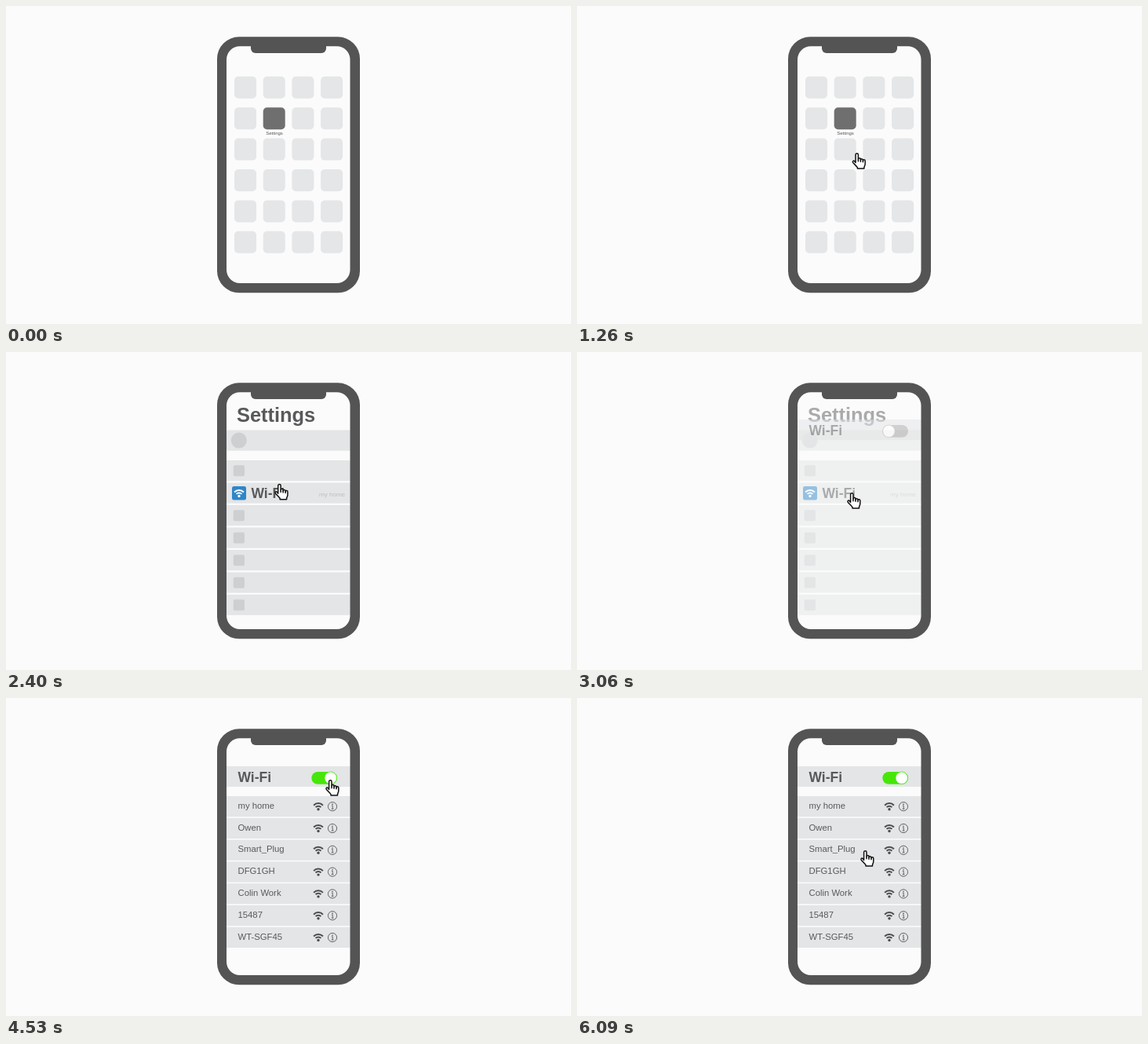
These frames come from a looping animation (720x405 px, 7170 ms). An HTML page:

```html
<!DOCTYPE html>
<html lang="en">
<head>
<meta charset="utf-8">
<title>Connect to Wi-Fi</title>
<style>
  html, body { margin: 0; width: 100%; height: 100%; overflow: hidden; background: #fbfbfb; }
  svg { display: block; width: 100vw; height: 100vh; }
  text { font-family: "Liberation Sans", Arial, sans-serif; fill: #58595b; }
  .bold { font-weight: bold; }
</style>
</head>
<body>
<svg viewBox="0 0 720 405">
  <defs>
    <g id="wifi" fill="none" stroke="currentColor" stroke-width="2">
      <path d="M-5.9-1.5A8 8 0 0 1 5.9-1.5M-3.4.9A4.7 4.7 0 0 1 3.4.9"/>
      <circle cy="3.5" r="1.7" fill="currentColor" stroke="none"/>
    </g>
    <g id="info" fill="none" stroke="#58595b" stroke-width=".9">
      <circle r="5.6"/>
      <path d="M-1.1-1.1H.2V3M-1.3 3H1.5"/>
      <circle cy="-2.8" r=".8" fill="#58595b" stroke="none"/>
    </g>
  </defs>
  <rect width="720" height="405" fill="#fbfbfb"/>
  <g id="home"></g>
  <g id="settings"></g>
  <g id="off"></g>
  <g id="on"></g>
  <g fill="#545454">
    <path fill-rule="evenodd" d="M297 39.3H423A28 28 0 0 1 451 67.3V337.3A28 28 0 0 1 423 365.3H297A28 28 0 0 1 269 337.3V67.3A28 28 0 0 1 297 39.3Z
      M298 51.3A17 17 0 0 0 281 68.3V336A17 17 0 0 0 298 353H421.5A17 17 0 0 0 438.5 336V68.3A17 17 0 0 0 421.5 51.3Z"/>
    <path d="M312 50H408V54A6 6 0 0 1 402 60H318A6 6 0 0 1 312 54Z"/>
  </g>
  <g id="hand" fill="#fff" stroke="#111" stroke-width="1.5" stroke-linejoin="round" stroke-linecap="round">
    <path d="M4.6 12.5V2.4a1.7 1.7 0 0 1 3.4 0V8a1.5 1.4 0 0 1 3 0V9.2a1.5 1.4 0 0 1 3 0V10a1.4 1.4 0 0 1 2.8 .3V14c0 2-.8 3-1.3 4.2V20H7V18.6C5.4 16.6 2.6 14 1.2 12.2c-.9-1.4.8-2.7 2-1.7z"/>
    <path fill="none" d="M8 8.2V10.8M11 9V11.2M14 10V11.8"/>
  </g>
</svg>
<script>
const LOOP = 7170;
const ROW = '#e3e5e6', MARK = '#cecfd1';
const $ = id => document.getElementById(id);
const range = n => [...Array(n).keys()];

const rect = (x, y, w, h, fill, r = 0) =>
  `<rect x="${x}" y="${y}" width="${w}" height="${h}" rx="${r}" fill="${fill}"/>`;
const text = (x, y, size, str, attrs = '') =>
  `<text x="${x}" y="${y}" font-size="${size}" ${attrs}>${str}</text>`;
const icon = (id, x, y, color) =>
  `<use href="#${id}" x="${x}" y="${y}" color="${color}"/>`;
const row = (y, h = 26.2) => rect(281, y, 158, h, ROW);
const bold = 'class="bold"';

function homeScreen() {
  const tiles = range(24).map(i => {
    const app = i === 5;
    return rect(291 + i % 4 * 36.7, 89.8 + Math.floor(i / 4) * 39.4, 28, 28, app ? '#6f6f6f' : '#e4e6e8', 5);
  });
  return tiles.join('') + text(342, 164.4, 6, 'Settings', 'text-anchor="middle"');
}

function settingsScreen() {
  const rows = range(7).map(i => {
    const y = 138 + i * 28.5;
    return row(y) + (i === 1 ? '' : rect(289.8, y + 6.2, 14.2, 14, MARK, 2));
  });
  return text(294, 88.6, 25.4, 'Settings', bold) + row(99.5) +
    `<circle cx="296.8" cy="112.6" r="10" fill="${MARK}"/>` + rows.join('') +
    rect(288, 171, 18, 17.6, '#2f86c8', 2.5) + icon('wifi', 297, 180, '#fff') +
    text(312.5, 185.8, 17.5, 'Wi-Fi', bold) +
    text(432, 183.6, 8, 'my home', 'text-anchor="end" style="fill:#bdbec0"');
}

function header(y, knobX, color) {
  return row(y) + text(295.5, y + 20.2, 17.5, 'Wi-Fi', bold) +
    rect(389.3, y + 7, 32.7, 15.8, color, 7.9) +
    `<circle cx="${knobX}" cy="${y + 14.9}" r="7.8" fill="#fff" stroke="${color}" stroke-width=".8"/>`;
}

function networkList() {
  const names = ['my home', 'Owen', 'Smart_Plug', 'DFG1GH', 'Colin Work', '15487', 'WT-SGF45'];
  return names.map((name, i) => {
    const y = 125 + i * 27.8;
    return row(y) + text(295.5, y + 15.7, 11.3, name) +
      icon('wifi', 398, y + 13.2, '#4d4d4d') + icon('info', 416, y + 13.2, '#58595b');
  }).join('');
}

$('home').innerHTML = homeScreen();
$('settings').innerHTML = settingsScreen();
$('off').innerHTML = header(86, 397.4, '#a6a6a8');
$('on').innerHTML = header(86.9, 413.7, '#46e60a') + networkList();

const ramp = (t, a, b) => Math.min(1, Math.max(0, (t - a) / (b - a)));
const ease = u => u * u * (3 - 2 * u);

// Hand moves: start, end, target x, target y
const START = [378, 285];
const MOVES = [
  [600, 1650, 338, 143],
  [2100, 2580, 344, 179],
  [3600, 3990, 407, 104],
  [5100, 5520, 361, 194]
];
const CLICKS = [[1650, 1920], [2670, 2940], [3990, 4260], [5760, 6090]];
const TIP = 6.3;

function handAt(t) {
  let [x, y] = START;
  for (const [a, b, tx, ty] of MOVES) {
    const u = ease(ramp(t, a, b));
    x += (tx - x) * u;
    y += (ty - y) * u;
  }
  const press = CLICKS.reduce((sum, [a, b]) => sum + Math.sin(Math.PI * ramp(t, a, b)), 0);
  return { x, y, scale: 1 - 0.13 * press };
}

function draw(t) {
  const toSettings = ramp(t, 1830, 2130);
  const toWifi = ramp(t, 2850, 3270);
  const toList = ramp(t, 4200, 4500);
  const show = (id, alpha) => $(id).setAttribute('opacity', alpha);
  show('home', 1 - toSettings);
  show('settings', toSettings * (1 - toWifi));
  show('off', toWifi * (1 - toList));
  show('on', toList);

  const { x, y, scale } = handAt(t);
  show('hand', ramp(t, 510, 660));
  $('hand').setAttribute('transform',
    `translate(${x + TIP} ${y}) scale(${scale}) translate(${-TIP} 0)`);
}

const begin = performance.now();
function tick() {
  draw((performance.now() - begin) % LOOP);
  requestAnimationFrame(tick);
}
tick();
</script>
</body>
</html>
```
